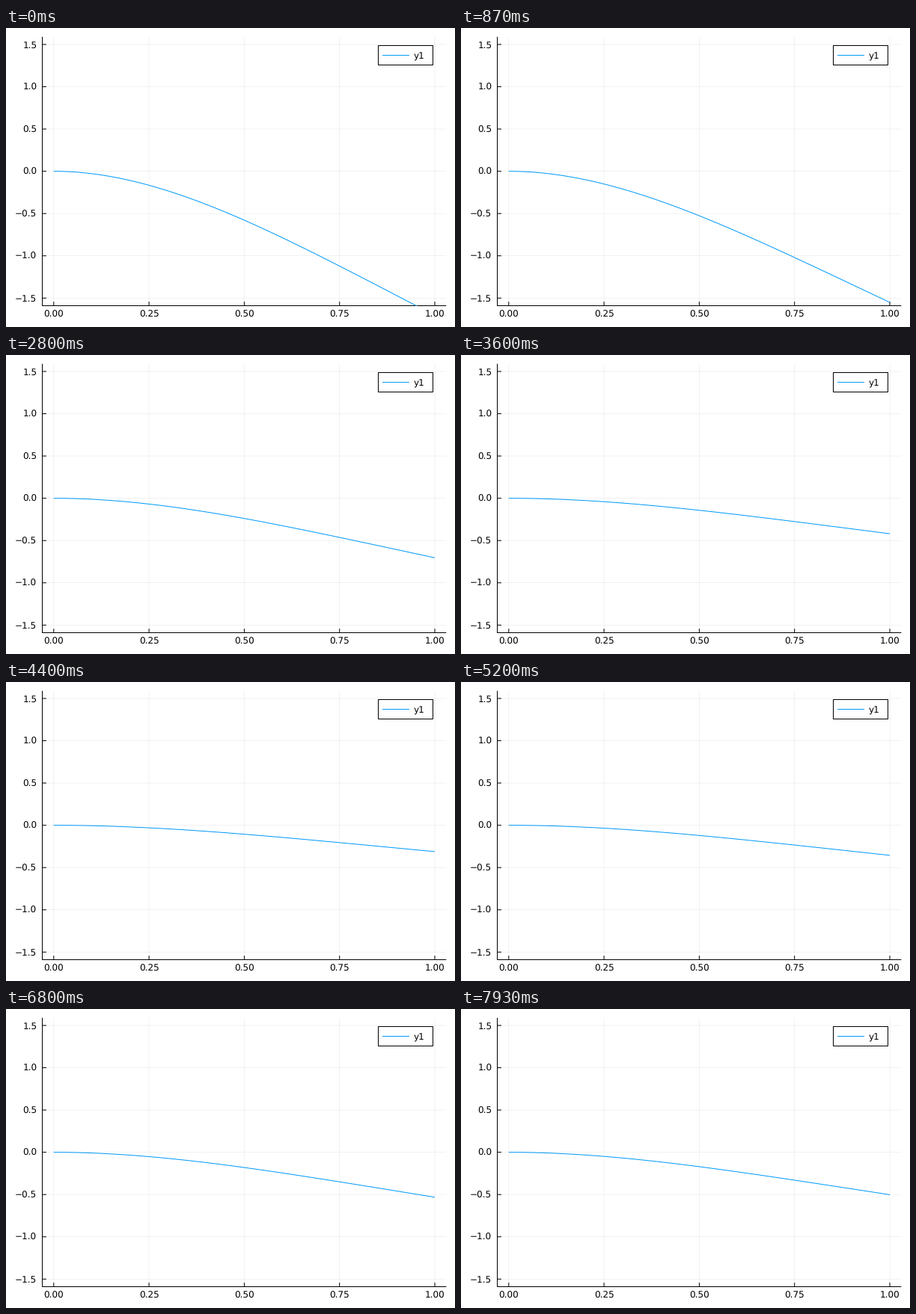
These frames come from a looping animation (600x400 px, 8000 ms). A matplotlib script:

```python
import numpy as np
import matplotlib.pyplot as plt
from matplotlib.animation import FuncAnimation
from matplotlib.patches import Rectangle

W, H, DPI = 600, 400, 100
FRAMES, LOOP = 120, 8000
PX = 72 / DPI  # points per pixel
BLUE = "#009AFA"
LEFT, RIGHT, TOP, BOTTOM = 48.5, 588.3, 11.8, 371.5

plt.rcParams.update({
    "font.family": "DejaVu Sans",
    "font.size": 12 * PX,
    "text.hinting": "none",
    "lines.solid_capstyle": "butt",
})
fig = plt.figure(figsize=(W / DPI, H / DPI), dpi=DPI, facecolor="white")
ax = fig.add_axes([0, 0, 1, 1])
ax.set_xlim(0, W)
ax.set_ylim(H, 0)
ax.axis("off")


def px(x):
    return 63.8 + 509.2 * x


def py(y):
    return 191.65 - 113.1 * y


def line(xs, ys, color="black", width=1.0, **kw):
    return ax.plot(xs, ys, color=color, lw=width * PX, snap=False, **kw)[0]


def grid(xs, ys):
    line(xs, ys, width=0.5, alpha=0.1, zorder=1)


# Grid, ticks and tick labels
for v in np.linspace(0, 1, 5):
    x = px(v)
    grid([x, x], [TOP, BOTTOM])
    line([x, x], [BOTTOM, BOTTOM - 5.4])
    ax.text(x, 387, f"{v:.2f}", ha="center", va="baseline")
for v in np.linspace(-1.5, 1.5, 7):
    y = py(v)
    grid([LEFT, RIGHT], [y, y])
    line([LEFT, LEFT + 5.4], [y, y])
    ax.text(41.3, y + 4.4, f"{v:.1f}".replace("-", "\u2212"),
            ha="right", va="baseline")

line([LEFT, LEFT, RIGHT], [TOP, BOTTOM, BOTTOM])

# Legend
ax.add_patch(Rectangle((497.5, 23.5), 73, 26, fc="white", ec="black",
                       lw=PX, zorder=5, snap=False))
line([503, 539], [36.5, 36.5], BLUE, zorder=6)
ax.text(544.7, 41, "y1", va="baseline", zorder=6)

# First bending mode of a clamped beam, scaled to 1 at the tip
xs = np.linspace(0, 1, 101)
b = 1.87510407
k = (np.cosh(b) + np.cos(b)) / (np.sinh(b) + np.sin(b))
mode = np.cosh(b * xs) - np.cos(b * xs) - k * (np.sinh(b * xs) - np.sin(b * xs))
mode /= mode[-1]

# Turning points of the decaying swing: time in seconds, tip deflection
TURNS = [(-0.115, -1.707), (4.41, -0.312), (7.15, -0.541), (9.3, -0.385)]


def tip(t):
    """Cosine swing from one turning point to the next."""
    for (t0, y0), (t1, y1) in zip(TURNS, TURNS[1:]):
        if t < t1:
            break
    return y0 + (y1 - y0) * np.sin(np.pi / 2 * (t - t0) / (t1 - t0)) ** 2


beam = line(px(xs), py(0 * xs), BLUE, zorder=3)
beam.set_clip_path(Rectangle((LEFT, TOP), RIGHT - LEFT, BOTTOM - TOP,
                             transform=ax.transData))


def update(n):
    beam.set_ydata(py(tip(n * LOOP / FRAMES / 1000) * mode))
    return [beam]


anim = FuncAnimation(fig, update, frames=FRAMES, interval=LOOP / FRAMES,
                     repeat=True, repeat_delay=0, blit=False)
plt.show()
```
